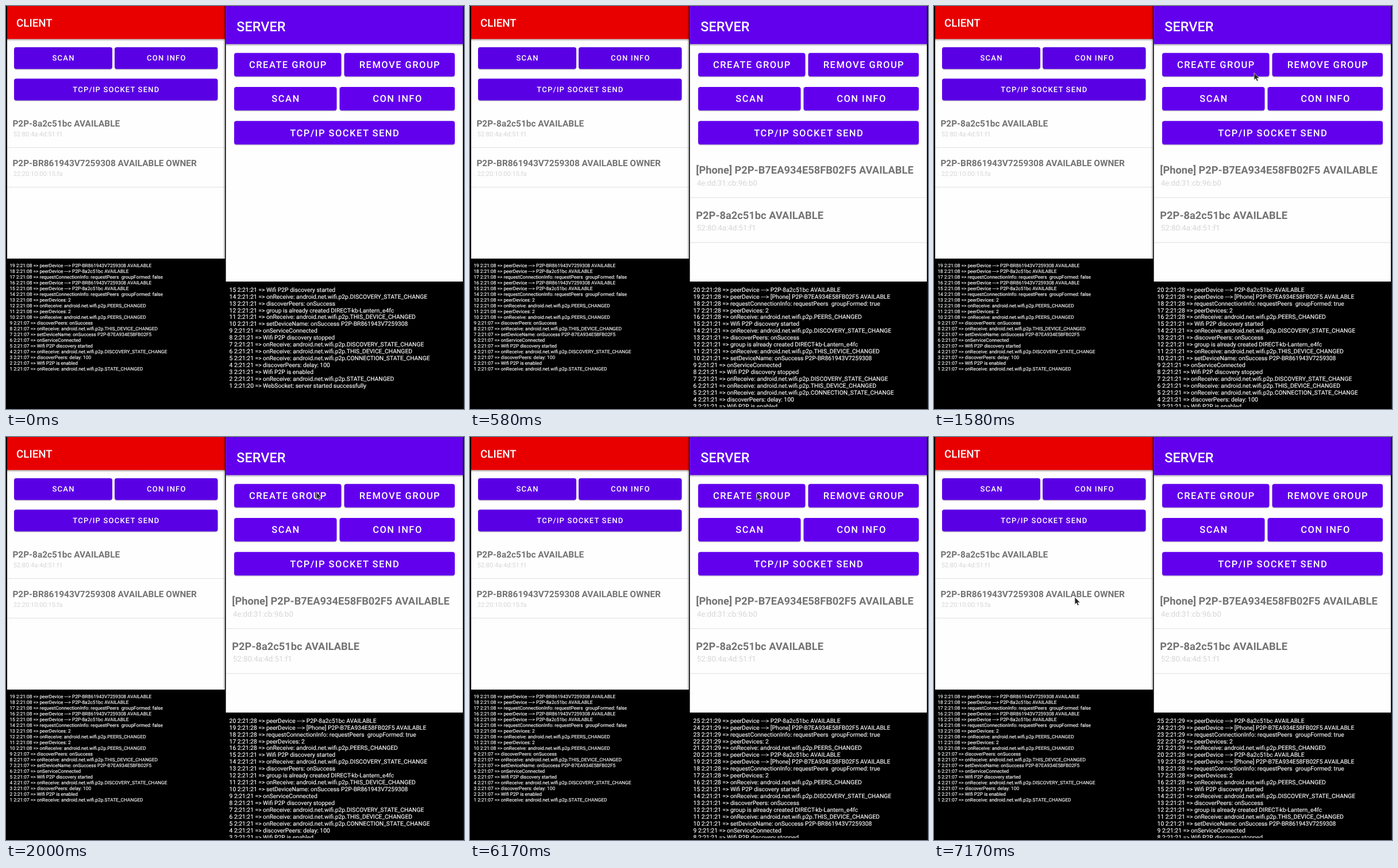
Write an HTML page that moves like this. It is 797 by 702 pixels and loops after 8000 ms.

```html
<!DOCTYPE html>
<html lang="en">
<head>
<meta charset="utf-8">
<title>Peer discovery: client and server</title>
<style>
  html, body { margin: 0; width: 100%; height: 100%; overflow: hidden; background: #000; }
  svg { display: block; width: 797px; height: 702px; }
  text { font-family: Roboto, Arial, sans-serif; white-space: pre; text-rendering: geometricPrecision; }
  .title { font-weight: 500; fill: #fff; }
  .label { font-weight: 500; fill: #fff; text-anchor: middle; }
  .name { font-weight: 700; fill: #737373; }
  .mac { fill: #d6d6d6; }
  .log { fill: #fff; stroke: #fff; stroke-width: .15; }
</style>
</head>
<body>
<svg id="stage" viewBox="0 0 797 702">
  <defs>
    <linearGradient id="edge"><stop offset="0" stop-opacity="0"/><stop offset="1" stop-opacity=".25"/></linearGradient>
    <linearGradient id="drop" x2="0" y2="1"><stop offset="0" stop-opacity=".3"/><stop offset="1" stop-opacity="0"/></linearGradient>
    <clipPath id="logClip"><path d="M383 480h412v218.5h-412z"/></clipPath>
  </defs>
  <g id="screens"></g>
  <g id="peers"></g>
  <g id="serverLog" clip-path="url(#logClip)"></g>
  <path id="cursor" d="M0 0V12.6L2.9 10 5 14.6 7.2 13.6 5.2 9.2H9.2Z" fill="#242424" stroke="#e8e8e8" stroke-width=".8"/>
</svg>
<script>
const $ = id => document.getElementById(id);
const PHONE = 'P2P-B7EA934E58FB02F5', HOST = 'P2P-BR861943V7259308', OTHER = 'P2P-8a2c51bc';
const EVENT = 'onReceive: android.net.wifi.p2p.';

const rect = (x, y, w, h, fill, more = '') =>
  `<rect x="${x}" y="${y}" width="${w}" height="${h}" fill="${fill}" ${more}/>`;
const text = (cls, x, y, size, str, more = '') =>
  `<text class="${cls}" x="${x}" y="${y}" font-size="${size}" ${more}>${str.replace(/>/g, '&gt;')}</text>`;

function button(x, y, right, h, size, fill, str) {
  const w = right - x, gap = size * .0893;
  return rect(x, y + 1.5, w, h, '#000', 'rx="4" opacity=".2"') + rect(x, y, w, h, fill, 'rx="4"') +
    text('label', x + w / 2 + gap / 2, y + h / 2 + size * .355, size, str, `letter-spacing="${gap}"`);
}

// A list row: name, address and the divider below them.
const peer = (x, y, size, macSize, macDrop, lineDrop, left, right, name, mac) =>
  text('name', x, y, size, name) +
  text('mac', x + size * .08, y + macDrop, macSize, mac) +
  rect(left, y + lineDrop, right - left, 1, '#e0e0e0');

// Log entries are listed newest first and numbered down to 1.
const log = (entries, x, y, size, pitch) => entries.map((entry, i) =>
  text('log', x, y + i * pitch, size, entry)).join('');
const number = entries => entries.map(([sec, msg], i) => `${entries.length - i} 2:21:${sec} => ${msg}`);
const at = (sec, ...msgs) => msgs.map(msg => [sec, msg]);
const found = name => `peerDevice ---> ${name} AVAILABLE`;
const request = formed => `requestConnectionInfo: requestPeers  groupFormed: ${formed}`;

const peersChanged = ['peerDevices: 2', EVENT + 'PEERS_CHANGED'];
const clientPeers = [found(HOST), found(OTHER), request(false)];
const serverPeers = [found(OTHER), found(`[Phone] ${PHONE}`), request(true), ...peersChanged];

const clientLog = number([
  ...at('08', ...clientPeers, ...clientPeers, ...peersChanged, ...peersChanged),
  ...at('07', 'discoverPeers: onSuccess', EVENT + 'THIS_DEVICE_CHANGED', `setDeviceName: onSuccess ${PHONE}`,
    'onServiceConnected', 'Wifi P2P discovery started', EVENT + 'DISCOVERY_STATE_CHANGE',
    'discoverPeers: delay: 100', 'Wifi P2P is enabled', EVENT + 'STATE_CHANGED')
]);
const serverLog = number([
  ...at('29', ...serverPeers),
  ...at('28', ...serverPeers),
  ...at('21', 'Wifi P2P discovery started', EVENT + 'DISCOVERY_STATE_CHANGE', 'discoverPeers: onSuccess',
    'group is already created DIRECT-kb-Lantern_e4fc', EVENT + 'THIS_DEVICE_CHANGED',
    `setDeviceName: onSuccess ${HOST}`, 'onServiceConnected', 'Wifi P2P discovery stopped',
    EVENT + 'DISCOVERY_STATE_CHANGE', EVENT + 'THIS_DEVICE_CHANGED', EVENT + 'CONNECTION_STATE_CHANGE',
    'discoverPeers: delay: 100', 'Wifi P2P is enabled', EVENT + 'STATE_CHANGED'),
  ...at('20', 'WebSocket: server started successfully')
]);

const clientButton = (x, y, right, str) => button(x, y, right, 38, 13.05, '#5a00e4', str);
const serverButton = (x, y, right, str) => button(x, y, right, 41, 16.5, '#6200ee', str);
const clientPeer = (y, name, mac) => peer(11.4, y, 15.42, 11.15, 16.7, 35.6, 2, 381, name, mac);
const serverPeer = (y, name, mac) => peer(393.3, y, 18.3, 13.35, 20.5, 41, 383, 795, name, mac);

$('screens').innerHTML =
  rect(0, 0, 797, 702, '#000') +
  rect(2, 0, 379, 440, '#fefefe') + rect(2, 0, 379, 57.6, '#e80000') + rect(2, 57.6, 379, 4, 'url(#drop)') +
  text('title', 18, 36.2, 18.75, 'CLIENT') +
  clientButton(14, 71.8, 185, 'SCAN') + clientButton(189, 71.8, 368.5, 'CON INFO') +
  clientButton(14, 126.6, 368.5, 'TCP/IP SOCKET SEND') +
  clientPeer(210.4, `${OTHER} AVAILABLE`, '52:80:4a:4d:51:f1') +
  clientPeer(279.4, `${HOST} AVAILABLE OWNER`, '22:20:10:00:15:fa') +
  rect(377, 0, 4, 440, 'url(#edge)') +
  log(clientLog, 6.4, 454.5, 8.35, 10) +
  rect(382.6, 0, 412.4, 480, '#fefefe') + rect(382.6, 0, 412.4, 66.4, '#6200ee') +
  rect(382.6, 66.4, 412.4, 4, 'url(#drop)') + rect(795, 0, 2, 702, '#140a1c') +
  text('title', 401.3, 44.2, 23.5, 'SERVER') +
  serverButton(397, 81.7, 583.5, 'CREATE GROUP') + serverButton(588.5, 81.7, 781, 'REMOVE GROUP') +
  serverButton(397, 141, 575.5, 'SCAN') + serverButton(580.5, 141, 781, 'CON INFO') +
  serverButton(397, 200.3, 781, 'TCP/IP SOCKET SEND');

$('peers').innerHTML =
  serverPeer(292.3, `[Phone] ${PHONE} AVAILABLE`, '4e:dd:31:cb:96:b0') +
  serverPeer(370.5, `${OTHER} AVAILABLE`, '52:80:4a:4d:51:f1');

// Cursor path: [tick, x, y], twelve ticks per second.
const path = [
  [14, 685, 152], [19, 557, 116.5], [20, 548, 112], [21, 548, 112], [24, 540, 96], [73, 540, 96],
  [74, 499, 97], [76, 470, 120], [81, 318, 240], [83, 283, 266], [86, 245, 279], [96, 245, 279]
];

function cursorAt(tick) {
  const i = path.findIndex(key => key[0] > tick);
  const [t0, x0, y0] = path[i - 1], [t1, x1, y1] = path[i];
  const f = (tick - t0) / (t1 - t0);
  return [x0 + (x1 - x0) * f, y0 + (y1 - y0) * f];
}

let shown = 0;
function draw(now) {
  const tick = Math.floor(((now % 8000) + 3.5) * 12 / 1000) % 96;
  const lines = tick < 6 ? 15 : tick < 7 ? 17 : tick < 26 ? 20 : 25;
  if (lines !== shown) {
    shown = lines;
    $('serverLog').innerHTML = log(serverLog.slice(-lines), 388.6, 497.6, 10.32, 11.97);
    $('peers').style.display = lines > 15 ? '' : 'none';
  }
  const visible = tick >= 14;
  $('cursor').style.display = visible ? '' : 'none';
  if (visible) $('cursor').setAttribute('transform', `translate(${cursorAt(tick)})`);
}

const start = performance.now();
function loop() {
  draw(performance.now() - start);
  requestAnimationFrame(loop);
}
loop();
</script>
</body>
</html>
```
